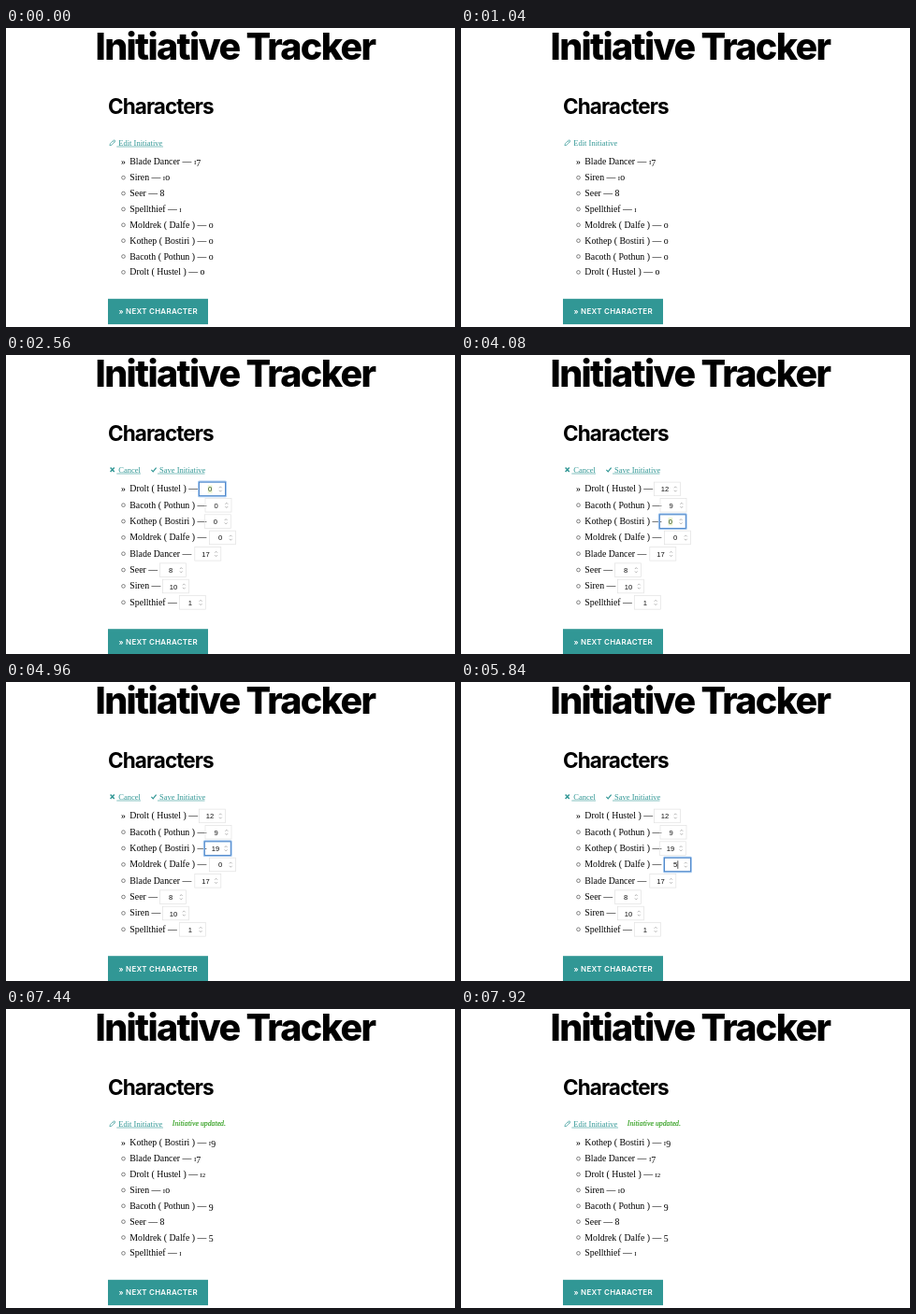
Animation, 480 px wide and 320 px high, one loop 8000 ms. Source, as an HTML page:

```html
<!DOCTYPE html>
<html lang="en">
<head>
<meta charset="utf-8">
<title>Initiative Tracker</title>
<style>
  html, body { margin: 0; width: 100%; height: 100%; overflow: hidden; background: #fff; }
  svg { display: block; width: 100vw; height: 100vh; }
  text { white-space: pre; font-family: "Liberation Serif", serif; font-size: 9.85px; }
  .head, .button { font-family: Inter, sans-serif; font-optical-sizing: none; letter-spacing: -.0415625em; }
  .title { font-size: 39.4px; font-weight: 800; text-anchor: middle; }
  .sub { font-size: 22.5px; font-weight: 700; }
  .button { font-size: 7.97px; font-weight: 600; letter-spacing: .0333em; fill: #fff; text-anchor: middle; }
  .link { font-size: 8.5px; fill: #319795; }
  .note { font-size: 7.8px; font-style: italic; fill: #2f9e1c; stroke: #2f9e1c; stroke-width: .15; }
  .value { font-family: "Liberation Sans", Arial, sans-serif; font-size: 7.6px; text-anchor: middle; }
  .line { fill: none; stroke: #319795; stroke-width: .7; }
</style>
</head>
<body>
<svg viewBox="0 0 480 320" preserveAspectRatio="none">
  <text class="head title" x="245" y="33.7">Initiative Tracker</text>
  <text class="head sub" x="109" y="92.2">Characters</text>
  <g id="view"></g>
</svg>
<script>
const LOOP = 8000;
const EDIT = 2080, SAVED = 7200;
const view = document.getElementById('view');

const names = {
  a: 'Drolt ( Hustel )', b: 'Bacoth ( Pothun )', c: 'Kothep ( Bostiri )', d: 'Moldrek ( Dalfe )',
  blade: 'Blade Dancer', seer: 'Seer', siren: 'Siren', thief: 'Spellthief'
};

const before = [['blade', 17], ['siren', 10], ['seer', 8], ['thief', 1], ['d', 0], ['c', 0], ['b', 0], ['a', 0]];
const after = [['c', 19], ['blade', 17], ['a', 12], ['siren', 10], ['b', 9], ['seer', 8], ['d', 5], ['thief', 1]];
// name, starting value, left edge of the input
const fields = [['a', 0, 206.5], ['b', 0, 213], ['c', 0, 212.3], ['d', 0, 217.5],
                ['blade', 17, 201.8], ['seer', 8, 164.5], ['siren', 10, 167.5], ['thief', 1, 185.3]];

// time, field, value typed (null: focus only, content selected)
const keys = [[EDIT, 0, null], [2800, 0, 1], [2960, 0, 12], [3360, 1, null], [3760, 1, 9],
              [4080, 2, null], [4560, 2, 1], [4800, 2, 19], [5440, 3, null], [5840, 3, 5]];

const text = (cls, x, y, s) => `<text class="${cls}" x="${x}" y="${y}">${s}</text>`;
const path = (d, style = '') => `<path class="line" d="${d}" style="${style}"/>`;

// Old-style figures: short 0 1 2, descending 3 4 5 7 9
function figures(n) {
  let drop = 0;
  return [...String(n)].map(c => {
    const low = '34579'.includes(c) ? 1.9 : 0;
    const dy = low - drop;
    drop = low;
    const shape = c === '0' ? 'o' : c === '1' ? 'I' : c;
    const size = c === '1' || c === '2' ? 7 : 9.85;
    return `<tspan dy="${dy}" style="font-size:${size}px">${shape}</tspan>`;
  }).join('');
}

const bullet = (i, y) => i
  ? `<circle cx="125.5" cy="${y - 3}" r="1.85" fill="none" stroke="#333" stroke-width=".6"/>`
  : text('', 122.9, y, '»');

function link(x, label, end, hover) {
  return text('link', x, 125.6, label) + (hover ? '' : path(`M${x - 2} 127H${end}`, 'stroke-width:.6'));
}

function button(y) {
  return `<rect x="109" y="${y}" width="107" height="27.3" fill="#319795"/>` +
    text('button', 162.7, y + 16.3, '» NEXT CHARACTER');
}

function list(rows, hover, note) {
  const items = rows.map(([id, n], i) => {
    const y = 146.3 + 16.87 * i;
    return bullet(i, y) + text('', 132.3, y, `${names[id]} — ${figures(n)}`);
  });
  return path('M110.9 125.8l.5-2 3.6-3.6q.8-.5 1.4.1t.1 1.4l-3.6 3.6zM114.3 120.9l1.5 1.5') +
    link(120.3, 'Edit Initiative', 168, hover) +
    (note ? text('note', 177.8, 125.4, 'Initiative updated.') : '') +
    items.join('') + button(289.8);
}

function input(x, y, value, focus, selected, caret) {
  const top = y - 10.2, mid = y - 2.8, cx = x + 11.6;
  const box = (grow, color, w) => `<rect x="${x - grow}" y="${top - grow}" width="${28 + 2 * grow}" ` +
    `height="${14.6 + 2 * grow}" rx="${grow}" fill="none" stroke="${color}" stroke-width="${w}"/>`;
  const ring = focus ? box(.5, '#a5c9f0', 2) + box(0, '#4a83c6', .9) : box(0, '#e2e2e2', .7);
  const mark = selected ? `<rect x="${cx - 2.4}" y="${mid - 4.2}" width="4.8" height="8.6" fill="#eef6d6"/>` : '';
  const sx = x + 22.8;
  return ring + mark +
    `<text class="value" x="${cx}" y="${y + .1}" fill="${selected ? '#2c4a1c' : '#111'}">${value}</text>` +
    (caret ? `<path d="M${cx + 2.7} ${mid - 4.3}v8.6" stroke="#111" stroke-width=".7"/>` : '') +
    `<path d="M${sx - 1.4} ${mid - 1.2}l1.4-1.5 1.4 1.5M${sx - 1.4} ${mid + 1.2}l1.4 1.5 1.4-1.5" ` +
    'fill="none" stroke="#999" stroke-width=".7"/>';
}

function form(t) {
  const values = fields.map(f => f[1]);
  let focus = 0, selected = true;
  for (const [at, field, value] of keys) {
    if (t < at) break;
    focus = field;
    selected = value === null;
    if (!selected) values[field] = value;
  }
  const caret = t >= 5840 && t < 6400;
  const items = fields.map(([id, , x], i) => {
    const y = 146.3 + 17.35 * i, on = i === focus;
    return bullet(i, y) + text('', 132.3, y, `${names[id]} —`) +
      input(x, y, values[i], on, on && selected, on && caret);
  });
  return path('M111.6 120.6l4.2 4.4M115.8 120.6l-4.2 4.4', 'stroke-width:1.5') +
    link(120.3, 'Cancel', 144, false) +
    path('M155.4 122.9l1.8 1.9 3.4-4.2', 'stroke-width:1.2') +
    link(164, 'Save Initiative', 212.5, t >= 6640) +
    items.join('') + button(293.2);
}

function scene(t) {
  if (t < EDIT) return list(before, t >= 880, false);
  if (t < SAVED) return form(t);
  return list(after, false, true);
}

let shown;
function tick() {
  const next = scene(performance.now() % LOOP);
  if (next !== shown) view.innerHTML = shown = next;
  requestAnimationFrame(tick);
}
tick();
</script>
</body>
</html>
```
